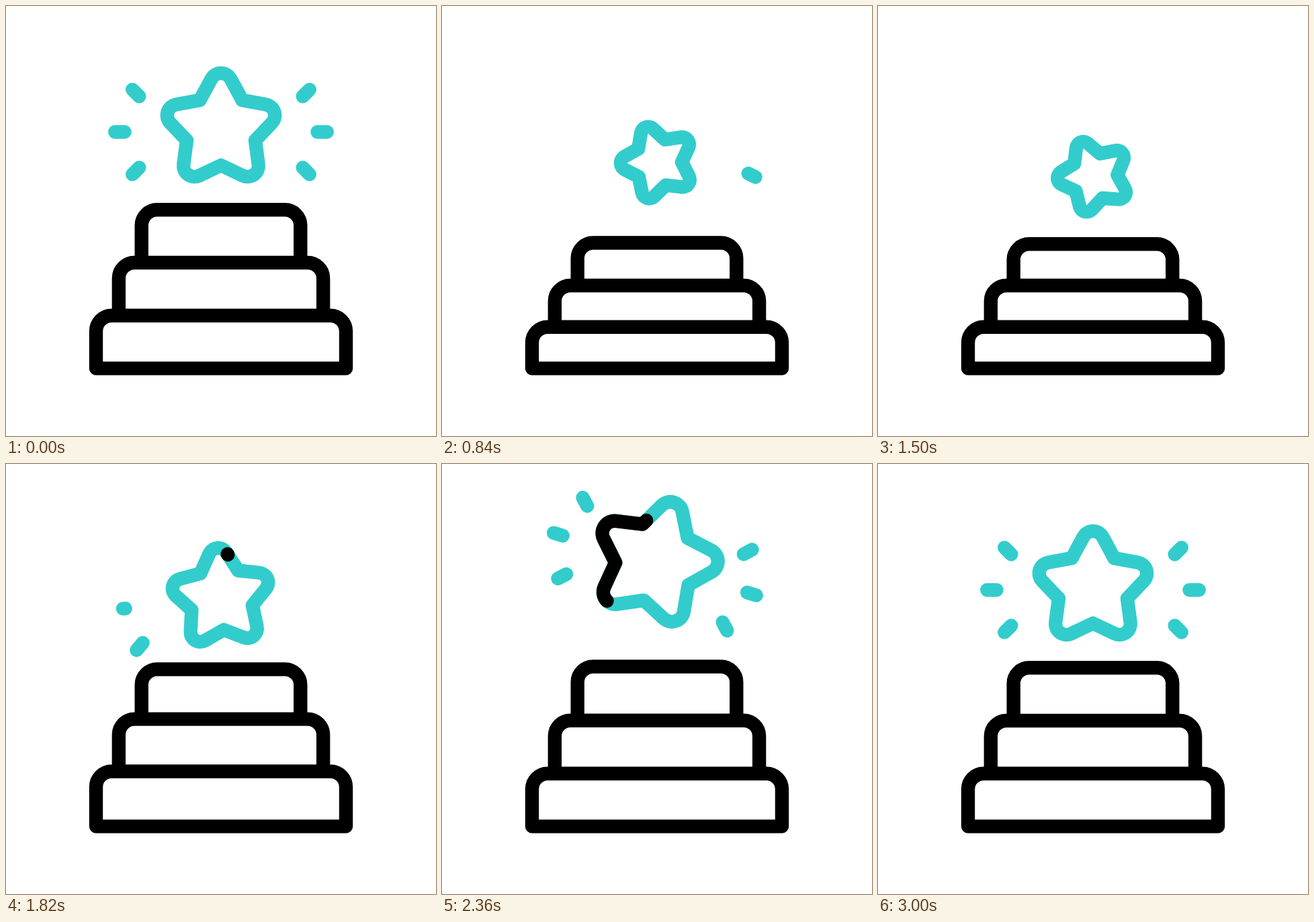
Recreate the animation shown at these times as an HTML page with a canvas. Size 640x640 px, loop 3220 ms.

```html
<!DOCTYPE html>
<html lang="en">
<head>
<meta charset="utf-8">
<title>Star podium</title>
<style>
  html, body { margin: 0; width: 100%; height: 100%; overflow: hidden; background: #fff; }
  canvas { display: block; width: 640px; height: 640px; }
</style>
</head>
<body>
<canvas id="stage"></canvas>
<script>
const LOOP = 3220, LAST = 3000, STEP = 20;
const TEAL = '#33cccc', BLACK = '#000', LINE = 20.4;

const canvas = document.getElementById('stage');
const ctx = canvas.getContext('2d');
const dpr = window.devicePixelRatio || 1;
canvas.width = canvas.height = 640 * dpr;

const ramp = (t, from, to) => Math.min(1, Math.max(0, (t - from) / (to - from)));

function ease(t, from, to) {
  const u = ramp(t, from, to);
  return u * u * (3 - 2 * u);
}

// Rest, dip to low, lift to high, settle back to rest.
function swing(t, low, high, dip, lift, settle) {
  const up = ease(t, ...lift);
  return low * (ease(t, ...dip) - up) + high * (up - ease(t, ...settle));
}

function strokeWith(color) {
  ctx.strokeStyle = color;
  ctx.stroke();
}

function drawStep(left, top, foot, closed) {
  const right = 640 - left, r = 23.2;
  ctx.beginPath();
  ctx.moveTo(left, foot);
  ctx.arcTo(left, top, 320, top, r);
  ctx.arcTo(right, top, right, foot, r);
  ctx.lineTo(right, foot);
  if (closed) ctx.closePath();
  strokeWith(BLACK);
}

// Bottom step first; each one up follows a little later.
function drawSteps(t) {
  let below = 539.4;
  for (let i = 0; i < 3; i++) {
    const start = 65 * i * i, peak = 1920 + 80 * i;
    const height = 78.7 + swing(t, -17, 6.6,
      [start, start + 640 + 45 * i], [1500 + 20 * i, peak], [peak, peak + 410]);
    const top = below - height;
    const foot = i ? Math.min(top + 70, below - 8) : below;
    drawStep(134 + 33.85 * i, top, foot, i === 0);
    below = top;
  }
}

// Clockwise from lower left, each shrinking towards the star and growing back.
function drawRays(t) {
  for (let i = 0; i < 6; i++) {
    const side = i < 3 ? -1 : 1;
    const row = i < 3 ? 1 - i : i - 4;
    const hide = 385 + 88 * i, show = 1697 + 96 * i;
    const size = 1 - ramp(t, hide, hide + 100) + ramp(t, show, show + 100);
    if (size <= 0) continue;
    const x = side * (row ? 121.7 : 143.5), y = 10.5 + 53 * row;
    const angle = row * Math.PI / 4, length = 14.3 * size;
    ctx.beginPath();
    ctx.moveTo(x, y);
    ctx.lineTo(x + side * length * Math.cos(angle), y + length * Math.sin(angle));
    strokeWith(TEAL);
  }
}

// Even points are tips, odd ones are notches.
function starPath(s) {
  const point = i => {
    const r = (i % 2 ? 53.6 : 101.5) * s, a = i * Math.PI / 5;
    return [r * Math.sin(a), 6.5 * s - r * Math.cos(a)];
  };
  const start = [16 * s, -65.6 * s];
  ctx.beginPath();
  ctx.moveTo(...start);
  for (let i = 1; i < 10; i += 2) {
    ctx.lineTo(...point(i));
    ctx.arcTo(...point(i + 1), ...(i < 9 ? point(i + 2) : start), 16.4 * s);
  }
  ctx.closePath();
}

function drawStar(t, s) {
  starPath(s);
  strokeWith(TEAL);
  const total = 531 * s;
  const head = ease(t, 1800, 2515) * total;
  const tail = ease(t, 1985, 2680) * total;
  if (head <= tail) return;
  ctx.setLineDash([head - tail, total * 2]);
  ctx.lineDashOffset = -tail;
  strokeWith(BLACK);
  ctx.setLineDash([]);
}

function draw(t) {
  ctx.setTransform(dpr, 0, 0, dpr, 0, 0);
  ctx.fillStyle = '#fff';
  ctx.fillRect(0, 0, 640, 640);
  ctx.lineWidth = LINE;
  ctx.lineCap = ctx.lineJoin = 'round';
  drawSteps(t);

  const hop = Math.sin(Math.PI * ramp(t, 0, 440));
  const y = swing(t, 72.8, -40, [315, 1128], [1480, 2160], [2260, 3000]) - 2.5 * hop;
  const turn = swing(t, -21.8, 18, [79, 1060], [1450, 2260], [2260, 3000]);
  const scale = 1 + swing(t, -0.35, 0.13, [267, 921], [1480, 2160], [2200, 2880]) + 0.03 * hop;
  ctx.translate(320, 177 + y);
  ctx.rotate(turn * Math.PI / 180);
  drawRays(t);
  drawStar(t, scale);
}

const begin = performance.now();
function tick() {
  const t = (performance.now() - begin) % LOOP;
  draw(Math.min(LAST, Math.floor(t / STEP) * STEP));
  requestAnimationFrame(tick);
}
tick();
</script>
</body>
</html>
```
